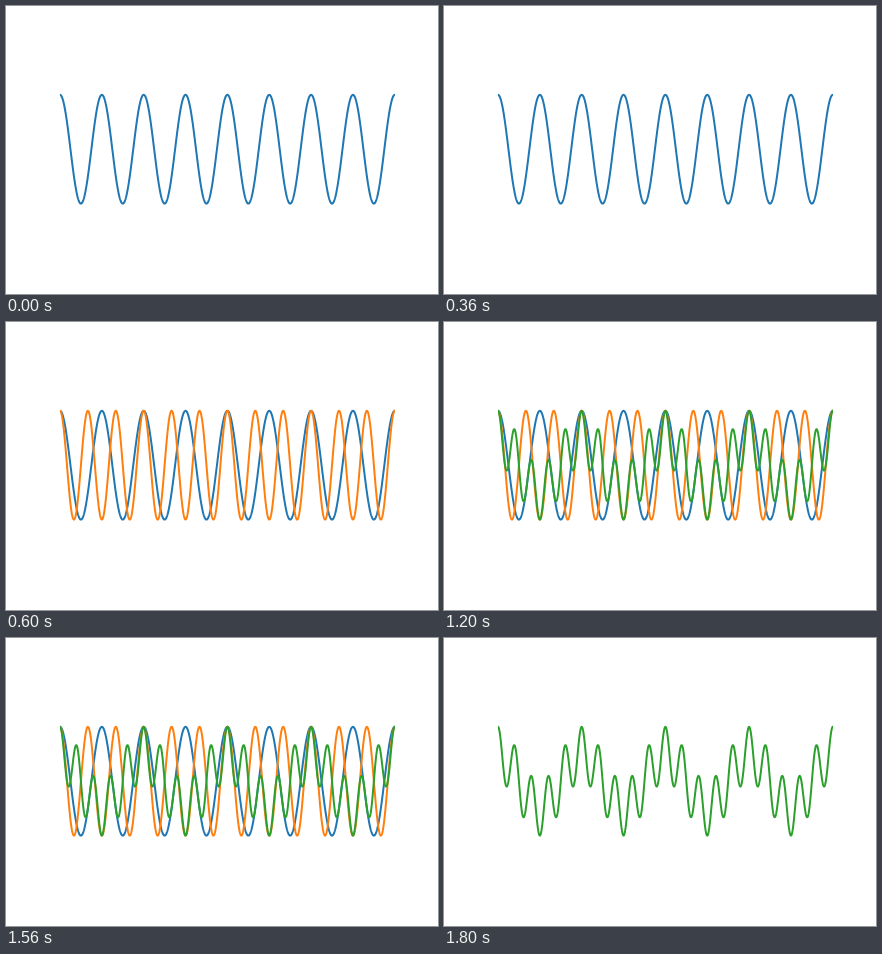
Animation of 432 by 288 pixels, one loop 2400 ms. Source, as an HTML page:

```html
<!DOCTYPE html>
<html lang="en">
<head>
<meta charset="utf-8">
<title>Product of two cosines</title>
<style>
  html, body { margin: 0; width: 100%; height: 100%; overflow: hidden; background: #fff; }
  svg { display: block; width: 432px; height: 288px; }
  path { fill: none; stroke-width: 2; stroke-linejoin: round; stroke-linecap: square; }
</style>
</head>
<body>
<svg viewBox="0 0 432 288">
  <clipPath id="axes"><rect x="54" y="34" width="335" height="222"/></clipPath>
  <g id="plot" clip-path="url(#axes)"></g>
</svg>
<script>
const LOOP = 2400, STEP = 600;
const LEFT = 54, WIDTH = 334.8, MID = 143.2, AMP = 54.4, SAMPLES = 1000;

const wave = cycles => u => Math.cos(2 * Math.PI * cycles * u);
const slow = wave(8), fast = wave(12);

// Each curve is visible from step `from` up to step `to`.
const curves = [
  { color: '#1f77b4', f: slow, from: 0, to: 3 },
  { color: '#ff7f0e', f: fast, from: 1, to: 3 },
  { color: '#2ca02c', f: u => slow(u) * fast(u), from: 2, to: 4 }
];

function trace(f) {
  let d = '';
  for (let i = 0; i <= SAMPLES; i++) {
    const u = i / SAMPLES;
    d += (i ? 'L' : 'M') + (LEFT + WIDTH * u).toFixed(2) + ' ' + (MID - AMP * f(u)).toFixed(2);
  }
  return d;
}

const plot = document.getElementById('plot');
for (const c of curves) {
  c.path = document.createElementNS('http://www.w3.org/2000/svg', 'path');
  c.path.setAttribute('d', trace(c.f));
  c.path.setAttribute('stroke', c.color);
  plot.append(c.path);
}

const start = performance.now();
function draw(now) {
  const step = Math.floor((Math.max(0, now - start) % LOOP) / STEP);
  for (const c of curves) {
    c.path.style.visibility = step >= c.from && step < c.to ? 'visible' : 'hidden';
  }
  requestAnimationFrame(draw);
}
draw(start);
</script>
</body>
</html>
```
